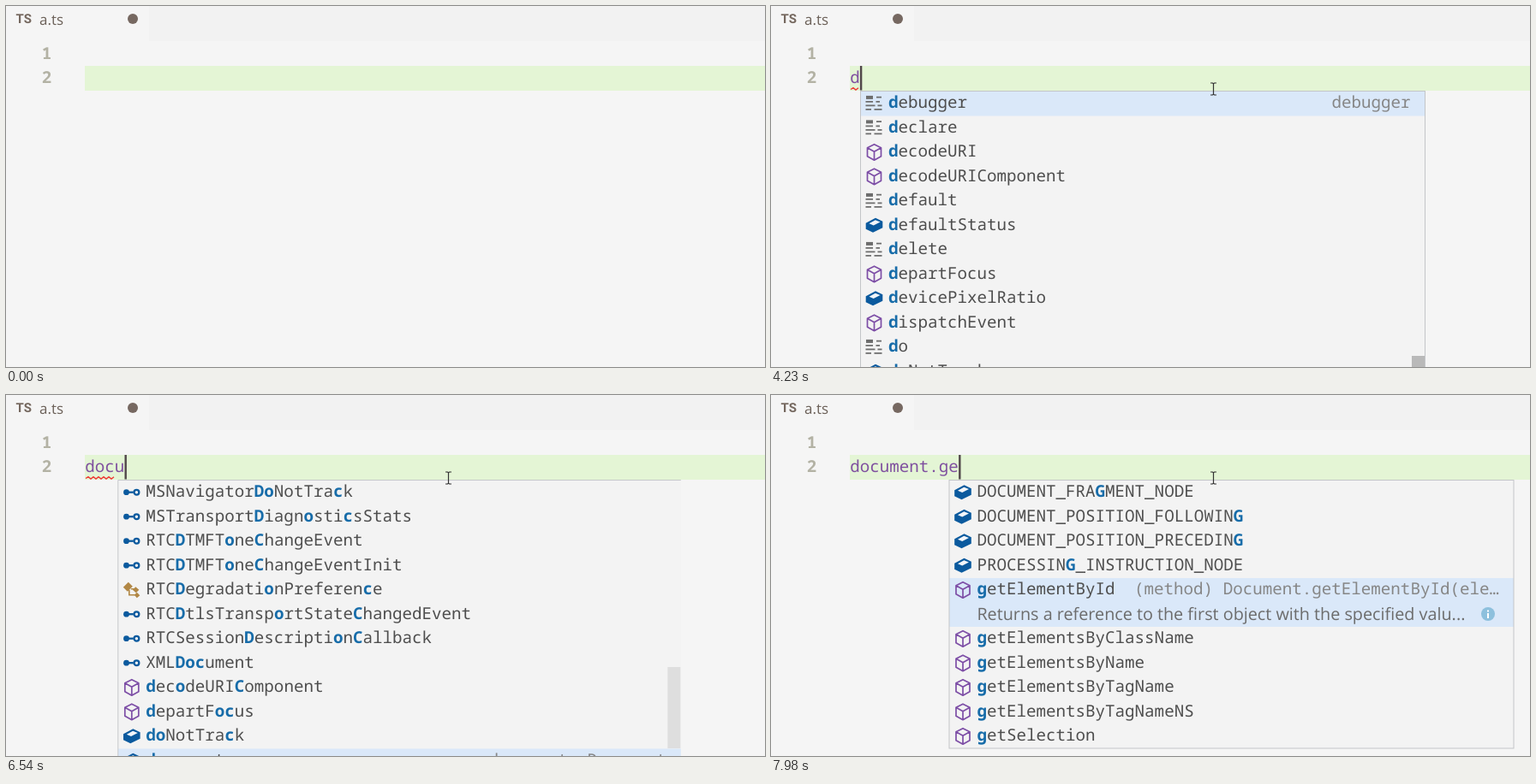
An HTML page for the animation above (8000 ms loop, 886 px wide and 422 px high).

```html
<!DOCTYPE html>
<html lang="en">
<head>
<meta charset="utf-8">
<title>Editor autocomplete</title>
<style>
  html, body { margin: 0; width: 100%; height: 100%; overflow: hidden; background: #f5f5f5; }
  svg { display: block; width: 886px; height: 422px; }
  text { white-space: pre; text-rendering: geometricPrecision; }
  .mono { font: 19.2px "Noto Sans Mono", monospace; }
  .ui { font-family: "Open Sans", "Noto Sans", sans-serif; }
  .num { font-weight: 600; fill: #b3b2a4; }
  .label { fill: #4e4e4e; }
  .hit { font-weight: 700; fill: #176ca9; }
  .detail { fill: #868686; }
</style>
</head>
<body>
<svg viewBox="0 0 886 422">
  <defs>
    <g id="k" fill="none" stroke="#6d6d6d" stroke-width="1.7">
      <path d="M-9.500-6.800H-1.500" stroke-width="4"/>
      <path d="M2.500-7H8.500M-10-1.800H-1.500M2-1.800H6.500M-10 2.600H1M4 2.600H9M-10 7.200H-3.500M0 7.200H9"/>
    </g>
    <path id="m" fill="none" stroke="#7d4ea6" stroke-width="1.7" stroke-linejoin="round"
      d="M0-9L8-5V5L0 9.500L-8 5V-5ZM-8-5L0-.500L8-5M0-.500V9.500"/>
    <g id="v">
      <path fill="#0b5a9e" d="M-9.800-2.500L1.500-8.500L9.800-4.500V3L-1.500 8.500L-9.800 4.500Z"/>
      <path fill="#f3f6fa" d="M-6-2L1.300-6L7-3.600L-.800 .300Z"/>
    </g>
    <g id="i" fill="none" stroke="#0b5a9e" stroke-width="2.300">
      <circle cx="-6.300" r="3.400" fill="#0b5a9e" stroke="none"/>
      <path d="M-4 0H2"/><circle cx="5.600" r="2.900"/>
    </g>
    <g id="e" fill="#b18745">
      <path d="M-10-3L-4-9L1-4L-5 2Z"/>
      <path d="M1 0L4.500-3.500L8.500 0L5 3.500ZM3 6L6 3L9.500 6.500L6 9.500Z"/>
      <path d="M-3 0V6H4M-1-1H3" fill="none" stroke="#b18745" stroke-width="1.600"/>
    </g>
  </defs>
  <rect width="886" height="422" fill="#f5f5f5"/>
  <rect x="167" width="719" height="41" fill="#f2f2f2"/>
  <text x="11.500" y="20" font-family="Roboto, sans-serif" font-size="15" font-weight="700" fill="#75685f">TS</text>
  <text class="ui" x="39" y="22" font-size="17" fill="#6b6058">a.ts</text>
  <circle cx="148" cy="15" r="6" fill="#766861"/>
  <text class="mono num" x="41.700" y="61.700">1</text>
  <text class="mono num" x="41.700" y="90.200">2</text>
  <rect x="92" y="70" width="794" height="29" fill="#e4f5d5"/>
  <g id="editor"></g>
  <path id="mouse" fill="none" stroke="#333" stroke-width="1.200"
    d="M-3.500-7H-1L0-6L1-7H3.500M0-6V6M-3.500 7H-1L0 6L1 7H3.500"/>
</svg>
<script>
const LOOP = 8000, LEFT = 92, CH = 11.52, ROW = 28.5, TOP = 99.5;
const editor = document.getElementById('editor');
const mouse = document.getElementById('mouse');

// Each item is an icon letter followed by its label; thumb is [top, height].
const lists = {
  d: { query: 'd', sel: 0, detail: 'debugger', thumb: [409, 160],
    items: 'kdebugger kdeclare mdecodeURI mdecodeURIComponent kdefault vdefaultStatus kdelete mdepartFocus vdevicePixelRatio mdispatchEvent kdo vdoNotTrack' },
  di: { query: 'di', sel: 11, thumb: [404, 160],
    items: 'iSVGGradientElement iVideoPlaybackQuality iWebGLRenderingContext iWindowTimersExtension iXDomainRequest maddEventListener mdecodeURI mdecodeURIComponent vdefaultStatus mdepartWithin vdevicePixelRatio mdispatchEvent' },
  do: { query: 'do', sel: 11, thumb: [402, 160],
    items: 'iVideoPlaybackQuality iWindowConsole iWindowLocalStorage iWindowSessionStorage iWindowTimers iXDomainRequest iXMLDocument mdecodeURI mdecodeURIComponent mdepartFocus vdevicePixelRatio kdo' },
  doc: { query: 'doc', sel: 11, detail: 'document: Document', thumb: [318, 95], soft: true,
    items: 'iMSNavigatorDoNotTrack iMSTransportDiagnosticsStats iRTCDTMFToneChangeEvent iRTCDTMFToneChangeEventInit eRTCDegradationPreference iRTCDtlsTransportStateChangedEvent iRTCSessionDescriptionCallback iXMLDocument mdecodeURIComponent mdepartFocus vdoNotTrack vdocument' },
  docu: { query: 'docu', sel: 10, detail: 'document: Document',
    items: 'iDocument iDocumentEvent iDocumentFragment iDocumentOrShadowRoot iDocumentTimeline iDocumentType iHTMLDocument iSVGDocument iXMLDocument mdoScrollUp vdocument' },
  docum: { query: 'docum', sel: 9, detail: 'document: Document',
    items: 'iDocument iDocumentEvent iDocumentFragment iDocumentOrShadowRoot iDocumentTimeline iDocumentType iHTMLDocument iSVGDocument iXMLDocument vdocument' },
  all: { query: '', sel: 0,
    items: 'vATTRIBUTE_NODE vCDATA_SECTION_NODE vCOMMENT_NODE vDOCUMENT_FRAGMENT_NODE vDOCUMENT_NODE vDOCUMENT_POSITION_CONTAINED_BY vDOCUMENT_POSITION_CONTAINS vDOCUMENT_POSITION_DISCONNECTED vDOCUMENT_POSITION_FOLLOWING vDOCUMENT_POSITION_PRECEDING vDOCUMENT_TYPE_NODE vELEMENT_NODE' },
  g: { query: 'g', sel: 4, detail: '(method) Document.getElementById(ele…',
    docs: 'Returns a reference to the first object with the specified valu...',
    items: 'vDOCUMENT_FRAGMENT_NODE vDOCUMENT_POSITION_FOLLOWING vDOCUMENT_POSITION_PRECEDING vPROCESSING_INSTRUCTION_NODE mgetElementById mgetElementsByClassName mgetElementsByName mgetElementsByTagName mgetElementsByTagNameNS mgetSelection' }
};

// State changes; values persist until replaced. "bad" counts underlined characters.
const steps = [
  [0, { text: '', caret: false, bad: 0, list: '', x: 0, showThumb: true, showDetail: true }],
  [2790, { caret: true }],
  [3070, { text: 'd' }],
  [3300, { list: 'd', x: 104.5 }],
  [3360, { bad: 1 }],
  [3520, { text: 'di', x: 106.8 }],
  [3590, { list: 'di', x: 115.3 }],
  [3820, { bad: 2 }],
  [4010, { text: 'd', bad: 1 }],
  [4120, { list: 'd', x: 108 }],
  [4230, { x: 104.5 }],
  [4540, { text: 'do', x: 106.8 }],
  [4610, { list: 'do', x: 115.3 }],
  [4840, { bad: 2 }],
  [5000, { caret: false }],
  [5230, { showThumb: false }],
  [5470, { text: 'doc', caret: true }],
  [5540, { list: 'doc', x: 118, showThumb: true, showDetail: false }],
  [5610, { x: 124.2 }],
  [5710, { x: 127 }],
  [5950, { bad: 3 }],
  [6080, { caret: false }],
  [6240, { showDetail: true }],
  [6470, { text: 'docu', caret: true }],
  [6540, { x: 130.8 }],
  [6630, { list: 'docu', x: 138.3 }],
  [6790, { text: 'docum', x: 141 }],
  [6860, { list: 'docum', x: 149.8 }],
  [7110, { bad: 5 }],
  [7280, { text: 'document', bad: 0 }],
  [7360, { list: '' }],
  [7580, { text: 'document.' }],
  [7660, { list: 'all', x: 196.2 }],
  [7820, { text: 'document.g' }],
  [7900, { list: 'g', x: 208 }],
  [7980, { text: 'document.ge' }]
];

const rect = (x, y, w, h, fill, extra = '') =>
  `<rect x="${x}" y="${y}" width="${w}" height="${h}" fill="${fill}" ${extra}/>`;
const text = (x, y, cls, body, extra = '') =>
  `<text x="${x}" y="${y}" class="${cls}" ${extra}>${body}</text>`;

// Greedy fuzzy match: emphasise the first occurrence of each query letter in order.
function emphasise(label, query) {
  let n = 0;
  return [...label].map(c =>
    n < query.length && c.toLowerCase() === query[n] ? (n++, `<tspan class="hit">${c}</tspan>`) : c
  ).join('');
}

function squiggle(count) {
  let d = `M${LEFT + 1} 97.5`;
  for (let i = 1; i * 3 < count * CH; i++) d += `L${LEFT + 1 + i * 3} ${i % 2 ? 95.7 : 98}`;
  return `<path d="${d}" fill="none" stroke="#ee3a34" stroke-width="1.4"/>`;
}

function popup({ list, x, showThumb, showDetail }) {
  const { items, query, sel, detail, docs, thumb, soft } = lists[list];
  const names = items.split(' ');
  const width = soft ? 657 : 659;
  const right = x + width;
  const height = (names.length + (docs ? 1 : 0)) * ROW;
  const selY = TOP + .5 + sel * ROW;
  let out = rect(x, TOP, width, height, '#f3f3f3');
  out += rect(x, selY, width, docs ? ROW * 2 : ROW, '#dae8f9');
  names.forEach((item, i) => {
    const y = TOP + (i + (docs && i > sel ? 1 : 0)) * ROW;
    out += `<use href="#${item[0]}" x="${x + 16}" y="${y + 14.2}"/>`;
    out += text(x + 32.4, y + 19.7, 'mono label', emphasise(item.slice(1), query));
  });
  if (detail && showDetail)
    out += text(right - 17, selY + 19.2, 'mono detail', detail, 'text-anchor="end"');
  if (docs) {
    const y = selY + ROW + 13.5;
    out += text(x + 32.4, y + 7, 'ui', docs, 'font-size="19.8" fill="#6c6c6c"');
    out += `<circle cx="${x + 629}" cy="${y}" r="8" fill="#8dc0dd"/>`;
    out += rect(x + 628, y - 4.5, 2, 2, '#fff') + rect(x + 628, y - 1, 2, 6, '#fff');
  }
  if (thumb && showThumb)
    out += rect(right - 15.5, thumb[0], 15, thumb[1], soft ? '#dedede' : '#b9b9b9');
  out += soft
    ? `<path d="M${x} 422V${TOP}H${right}" fill="none" stroke="#c6c8cb"/>`
    : rect(x, TOP, width, height, 'none', 'stroke="#c3c5c8"');
  return out;
}

function drawEditor(s) {
  let out = text(LEFT + .2, 90.2, 'mono', s.text, 'fill="#7f509f"');
  if (s.bad) out += squiggle(s.bad);
  if (s.list) out += popup(s);
  if (s.caret) out += rect(LEFT + .4 + s.text.length * CH, 70, 2.4, 28.5, '#51474a');
  editor.innerHTML = out;
}

// The pointer moves in visible jumps, slowing towards each resting place.
function pointerAt(t) {
  const glide = (from, to, p) => {
    const k = 1 - (1 - p) ** 1.4;
    return from.map((v, i) => v + (to[i] - v) * k);
  };
  const enter = [700, 367], pause = [565.5, 233], rest = [516.5, 97];
  if (t < 1990) return glide(enter, pause, Math.min(2, Math.floor((t - 210) / 70)) / 2);
  return glide(pause, rest, Math.min(5, Math.floor((t - 1990) / 80) + 1) / 5);
}

let shown = -1;
function render(t) {
  let n = 0;
  while (n + 1 < steps.length && steps[n + 1][0] <= t) n++;
  if (n !== shown) {
    shown = n;
    drawEditor(Object.assign({}, ...steps.slice(0, n + 1).map(s => s[1])));
  }
  mouse.style.display = t < 210 ? 'none' : '';
  if (t >= 210) mouse.setAttribute('transform', `translate(${pointerAt(t).join(' ')})`);
}

const start = performance.now();
function tick() {
  render((performance.now() - start) % LOOP);
  requestAnimationFrame(tick);
}
render(0);
requestAnimationFrame(tick);
</script>
</body>
</html>
```
